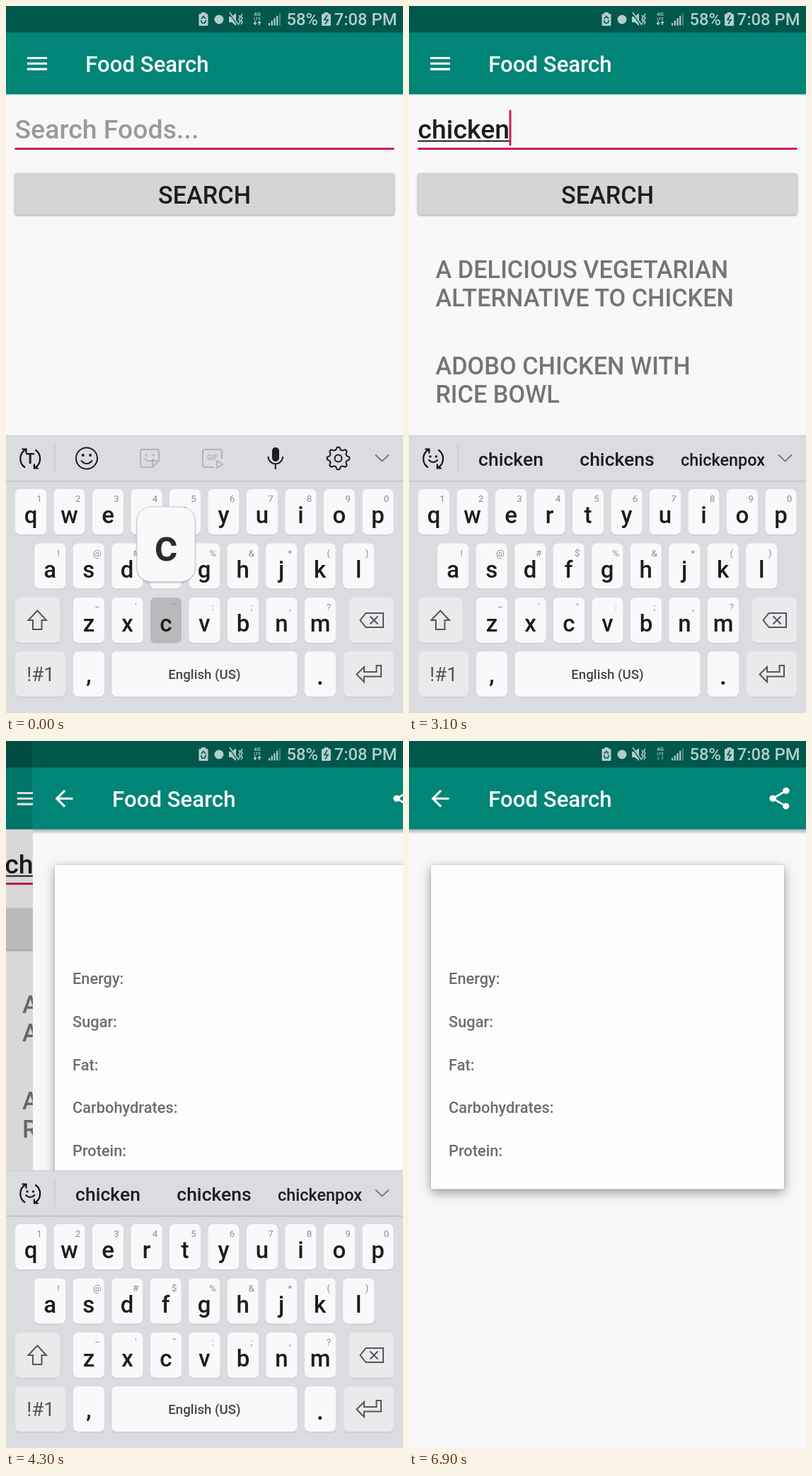
An HTML page that plays this animation: 561 by 998 pixels, repeating every 7000 ms.

```html
<!DOCTYPE html>
<html lang="en">
<head>
<meta charset="utf-8">
<title>Food Search</title>
<style>
html, body { margin: 0; width: 100%; height: 100%; overflow: hidden; background: #f8f7fa; }
svg { display: block; width: 561px; height: 998px; font-family: Roboto, sans-serif; font-weight: 500; }
</style>
</head>
<body>
<svg id="stage" viewBox="0 0 561 998"></svg>
<script>
const LOOP = 7000, STEP = 100, DP = 1.5583;
const INK = '#1d1c1e', PAGE = '#f8f7fa', ACCENT = '#cb205a', STATUS = '#b3cdc9';
const stage = document.getElementById('stage');
const ruler = document.createElement('canvas').getContext('2d');

const clamp = v => Math.min(1, Math.max(0, v));
const rect = (x, y, w, h, fill, r = 0, extra = '') =>
  `<rect x="${x}" y="${y}" width="${w}" height="${h}" rx="${r}" fill="${fill}" ${extra}/>`;
const text = (x, y, s, size, fill = INK, anchor = 'start', extra = '') =>
  `<text x="${x}" y="${y}" font-size="${size}" fill="${fill}" text-anchor="${anchor}" ${extra}>${s}</text>`;
const line = (d, color = INK, w = 2, extra = '') =>
  `<path d="${d}" fill="none" stroke="${color}" stroke-width="${w}" ${extra}/>`;
const dot = (x, y, r, fill) => `<circle cx="${x}" cy="${y}" r="${r}" fill="${fill}"/>`;
const ring = (x, y, r, color = INK, w = 2) =>
  `<circle cx="${x}" cy="${y}" r="${r}" fill="none" stroke="${color}" stroke-width="${w}"/>`;
const move = (x, y, body) => `<g transform="translate(${x} ${y})">${body}</g>`;
const icon = (x, y, d, fill = '#fff') =>
  `<path transform="translate(${x} ${y}) scale(${DP})" d="${d}" fill="${fill}"/>`;

const MENU = 'M3 18h18v-2H3zm0-5h18v-2H3zm0-7v2h18V6z';
const BACK = 'M20 11H7.83l5.59-5.59L12 4l-8 8 8 8 1.41-1.41L7.83 13H20z';
const SHARE = 'M18 16.1c-.8 0-1.4.3-2 .8l-7.1-4.2a3 3 0 0 0 0-1.4L16 7.2A3 3 0 1 0 15.1 5.7L8 9.8a3 3 0 1 0 0 4.4l7.1 4.1a2.9 2.9 0 1 0 2.9-2.2z';
const BOOKMARK = 'M17 3H7a2 2 0 0 0-2 2v16l7-3 7 3V5a2 2 0 0 0-2-2zm0 15-5-2.2L7 18V5h10z';

// time, typed text, key held down
const typing = [
  [0, '', 'c'], [100, 'c', ''], [200, 'c', 'h'], [300, 'ch', 'i'], [400, 'chi', ''],
  [600, 'chi', 'c'], [800, 'chic', 'k'], [900, 'chick', 'e'], [1000, 'chicke', 'n'],
  [1100, 'chicken', 'n'], [1200, 'chicken', '']
];
const hints = {
  c: ['can', 'come'], ch: ['check', 'change'], chi: ['child', 'chicken'], chic: ['chicken', 'chick'],
  chick: ['chicken', 'chuck'], chicke: ['chicken', 'chickens'], chicken: ['chickens', 'chickenpox']
};
const facts = [['Energy', '119.0 kcal'], ['Sugar', '1.76 g'], ['Fat', '2.64 g'],
  ['Carbohydrates', '15.86 g'], ['Protein', '7.93 g']];

const keys = [];
[['qwertyuiop', '1234567890', 13, 682], ['asdfghjkl', '!@#$%&*()', 40.2, 758.5],
 ['zxcvbnm', '\u2212\'":;,?', 95, 835]].forEach(([letters, marks, x, y]) =>
  [...letters].forEach((c, i) => keys.push({ c, mark: marks[i].replace('&', '&amp;'), x: x + i * 54.5, y })));

function header(glyph) {
  return rect(0, 0, 561, 998, PAGE) + rect(0, 0, 561, 38, '#00574b') + rect(0, 37.5, 561, 87.2, '#008577') +
    icon(25.3, 62.6, glyph) + text(112.2, 93, 'Food Search', 31.17, '#fff');
}

// Material indeterminate ring: trim path plus steady rotation
function spinner(ms) {
  const p = ms / 1333;
  let lo = 0, hi = 1;
  for (let i = 0; i < 30; i++) {
    const u = (lo + hi) / 2, v = 1 - u;
    if (.6 * v * v * u + .3 * v * u * u + .5 * u ** 3 < p) lo = u; else hi = u;
  }
  const start = ms * .2295 - 90, sweep = 270 * lo * lo * (3 - 2 * lo);
  const at = deg => {
    const a = deg * Math.PI / 180;
    return `${280.5 + 42 * Math.cos(a)} ${428.5 + 42 * Math.sin(a)}`;
  };
  return line(`M${at(start)}A42 42 0 ${sweep > 180 ? 1 : 0} 1 ${at(start + sweep)}`, '#d81b60', 9.3);
}

function searchPage(t, typed) {
  const caret = t < 1600 ? typed : Math.floor((t - 1600) / 500) % 2;
  const press = t < 1600 ? 0 : t < 2400 ? 1 : clamp((2500 - t) / 200);
  let s = header(MENU);
  if (typed) {
    ruler.font = '500 37.4px Roboto, sans-serif';
    const w = ruler.measureText(typed).width;
    s += text(12.5, 187, typed, 37.4) + rect(12.5, 189.6, w, 2, INK);
    if (caret) s += rect(12 + w, 147, 3, 50, ACCENT);
  } else s += text(12.5, 187, 'Search Foods...', 37.4, '#9a999b');
  s += rect(12.5, 200, 536, 3, ACCENT) +
    rect(12.5, 236, 536, 58.5, '#d5d4d6', 3, 'style="filter:drop-shadow(0 1.5px 1.5px #0006)"') +
    rect(12.5, 236, 536, 58.5, '#000', 3, `opacity="${.052 * press}"`) +
    text(280.5, 279, 'SEARCH', 34.3, INK, 'middle');
  if (t >= 1700 && t < 2400) s += spinner(t - 1648);
  if (t >= 2400)
    ['A DELICIOUS VEGETARIAN', 'ALTERNATIVE TO CHICKEN', 'ADOBO CHICKEN WITH', 'RICE BOWL'].forEach((row, i) =>
      s += text(37.4, [384, 424, 520, 560][i], row, 34.3, '#757477'));
  return s;
}

function detailPage(t) {
  const loaded = t >= 4700 && t < 6900;
  let s = header(BACK) + rect(0, 124.7, 561, 7, 'url(#fade)') + icon(504.8, 62.4, SHARE) +
    rect(31, 175, 499, 457.5, '#fefdfe', 1, 'style="filter:drop-shadow(0 5px 8px #0005) drop-shadow(0 0 1px #0003)"');
  if (loaded) s += icon(56.2, 200.3, BOOKMARK, '#000') +
    text(93.5, 233, 'ADOBO CHICKEN WITH', 31.17, '#000') + text(93.5, 270, 'RICE BOWL', 31.17, '#000');
  facts.forEach(([name, value], i) => {
    const y = 343 + i * 60.8;
    s += text(56.1, y, name + ':', 21.8, '#6d6c6f');
    if (loaded) s += text(220.7, y, value, 21.8, '#6d6c6f');
  });
  return s;
}

function battery(x, inner) {
  return rect(x + 3.5, 9, 6, 3, STATUS) + rect(x, 11, 13, 17, STATUS, 1.5) + line(inner, '#00574b', 1.6);
}

function statusBar(t) {
  const arrows = t >= 6400 ? .35 : 1;
  let s = battery(272.5, 'M276 18l3-3.5 3 3.5M275.5 20l1.5 4h4l1.5-4') + dot(301, 19, 6.5, STATUS) +
    `<path d="M315 15h4l6-5v18l-6-5h-4z" fill="${STATUS}"/>` +
    line('M316 10l12 17', '#00574b', 3) + line('M316 9l13 18', STATUS, 1.6) +
    line('M329 13l2 3-2 3 2 3-2 3M334 11l-2 3 2 3-2 3 2 3-2 3', STATUS, 1.5) +
    text(355, 14, '4G', 8, STATUS, 'middle') + text(355, 20, 'LTE', 6, STATUS, 'middle') +
    line('M352 21v5M350 24l2 2 2-2M358 27v-5M356 24l2-2 2 2', STATUS, 1.5, `opacity="${arrows}"`);
  for (let i = 0; i < 5; i++)
    s += rect(371 + i * 3.7, 24 - i * 3.4, 2.2, 3.5 + i * 3.4, STATUS, 0, i > 3 ? 'opacity=".4"' : '');
  return s + text(396.5, 27.3, '58%', 23.8, STATUS) + battery(446, 'M454 13l-4 6.5h5l-4 6') +
    text(552.5, 27.3, '7:08 PM', 23.8, STATUS, 'end');
}

function toggle(typed) {
  const half = '<path d="M27 651.5A15 15 0 0 1 27 626.5M22.5 625.5h6v6" fill="none" stroke="#111" stroke-width="2.2"/>';
  return half + `<g transform="rotate(180 34.2 639)">${half}</g>` + (typed
    ? dot(30, 636, 1.7, INK) + dot(38.4, 636, 1.7, INK) + line('M27.5 640.5q6.7 7 13.4 0')
    : text(34.2, 646, 'T', 20, INK, 'middle', 'font-weight="700"'));
}

function gear(x, y) {
  let d = '';
  for (let i = 0; i < 32; i++) {
    const a = (i - .5) * Math.PI / 16, r = i % 4 < 2 ? 15.8 : 12.3;
    d += `${i ? 'L' : 'M'}${x + r * Math.sin(a)} ${y - r * Math.cos(a)}`;
  }
  return line(d + 'Z', INK, 2, 'stroke-linejoin="round"') + ring(x, y, 5);
}

function tools() {
  const pale = '#b3b5b8';
  return ring(114, 638.5, 15) + dot(108.8, 634, 2, INK) + dot(119.2, 634, 2, INK) + line('M106 641.5q8 9 16 0') +
    line('M193 626h20q3 0 3 3v13l-9 9h-14q-3 0-3-3v-19q0-3 3-3M216 642h-6q-3 0-3 3v6', pale) +
    dot(198, 634, 1.6, pale) + dot(208, 634, 1.6, pale) + line('M196 639q7 7 13 0', pale) +
    line('M294 651h-13q-3 0-3-3v-19q0-3 3-3h21q3 0 3 3v10', pale) +
    text(291.5, 641, 'GIF', 10, pale, 'middle', 'font-weight="700"') +
    line('M298 642l8 5-8 5z', pale, 1.8) +
    rect(376, 623, 10, 20, INK, 5) + line('M370.5 636a10.3 10.3 0 0 0 20.6 0M380.8 647v7') + gear(469.5, 638.5);
}

function suggestions(typed) {
  return [typed, ...hints[typed]].map((word, i) =>
    text([144, 294, 443.5][i], 648.5, word, word.length > 9 ? 23.4 : 26.5, INK, 'middle')).join('');
}

const keyBox = (x, y, w, fill = '#f9f8fb') =>
  rect(x, y + 1.3, w, 64, '#c8cacd', 7) + rect(x, y, w, 64, fill, 7);

function keyboard(typed, held) {
  const soft = '#e8eaec', gray = '#555659';
  let s = rect(0, 606, 561, 392, '#dadcdf') + rect(0, 606, 561, 1.2, '#cbcdd0') + rect(0, 670, 561, 1.5, '#c0c3c6') +
    rect(68.5, 619, 1.2, 38, '#c3c5c8') + toggle(typed) + (typed ? suggestions(typed) : tools()) +
    line('M522 633.5l9.5 9 9.5-9', '#77797c', 1.8);
  let popup = '';
  for (const { c, mark, x, y } of keys) {
    s += keyBox(x, y, 44, c === held ? '#b9b9bb' : undefined) +
      text(x + 22, y + 48, c, 33, INK, 'middle') +
      text(x + 34, y + 18, mark, 13.5, '#8e8e91', 'middle', 'font-weight="400"');
    if (c === held) popup = rect(x - 19, y - 128, 82, 105.5, '#f9f8fb', 20,
      'stroke="#d0d1d4" style="filter:drop-shadow(0 1px 1px #0004)"') +
      text(x + 22, y - 52, c, 63, '#2b2a2c', 'middle');
  }
  s += keyBox(13, 835, 63, soft) + keyBox(485, 835, 63, soft) + keyBox(13, 911, 71, soft) + keyBox(477, 911, 71, soft) +
    keyBox(95, 911, 44) + keyBox(149.5, 911, 262) + keyBox(422, 911, 44) +
    line('M44.3 853.5L57 867H50.5V880H38V867H31.5Z', gray) +
    line('M500.5 867L508.5 857H533V877H508.5ZM514.5 861.5l11 11M525.5 861.5l-11 11', gray) +
    line('M523.5 931H530V946.5H506V954L495.5 943.5L506 933V940H523.5Z', gray) +
    text(49, 952.5, '!#1', 27.5, gray, 'middle', 'font-weight="400"') +
    text(117, 955, ',', 33, INK, 'middle') + text(444, 957.5, '.', 37, INK, 'middle') +
    text(280.5, 949.5, 'English (US)', 18.7, '#454548', 'middle');
  return s + popup;
}

function scene(t) {
  const [, typed, held] = typing.filter(k => k[0] <= t).pop();
  const slide = 1 - (1 - clamp((t - 3856) / 600)) ** 2;
  const drop = 392 * clamp((t - 4300) / 300) ** 2;
  let s = '<defs><linearGradient id="fade" x2="0" y2="1"><stop stop-opacity=".3"/>' +
    '<stop offset="1" stop-opacity="0"/></linearGradient></defs>';
  if (slide < 1) s += move(-15.3 * slide, 0, searchPage(t, typed)) +
    rect(0, 0, 561, 998, '#000', 0, `opacity="${.14 * slide}"`);
  if (slide > 0) s += move(561 * (1 - slide), 0, detailPage(t));
  s += statusBar(t);
  if (drop < 392) s += move(0, drop, keyboard(typed, held));
  return s;
}

let shown = -1;
function tick() {
  const t = Math.floor(performance.now() % LOOP / STEP) * STEP;
  if (t !== shown) stage.innerHTML = scene(shown = t);
  requestAnimationFrame(tick);
}
tick();
</script>
</body>
</html>
```
